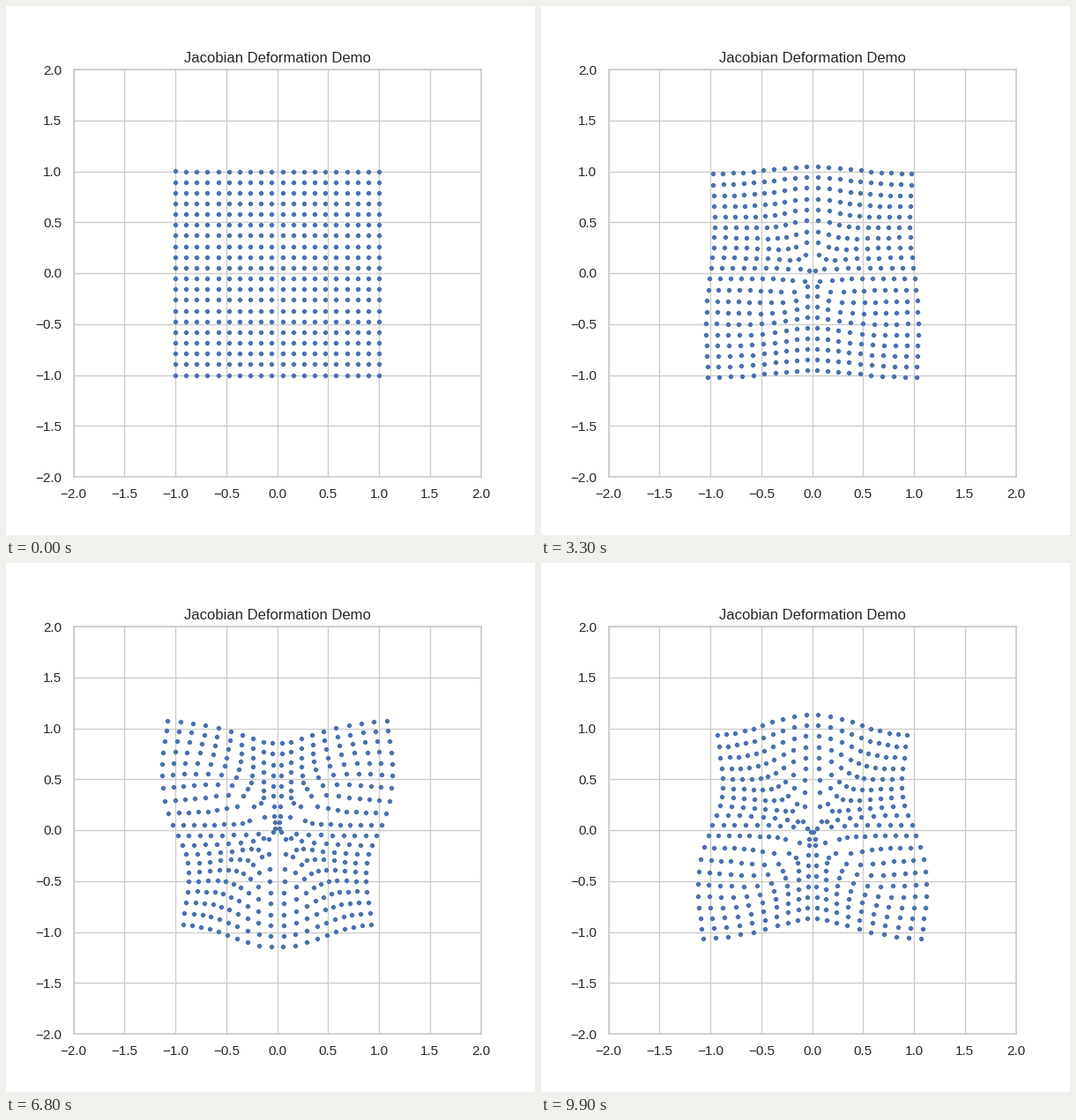
A matplotlib script for the animation above (10000 ms loop, 600 by 600 pixels).

```python
import numpy as np
import matplotlib.pyplot as plt
from matplotlib.animation import FuncAnimation

FRAMES = 100
STEP_MS = 100
AMPLITUDE = 0.3
INK = "0.15"
GRID = "0.8"
BLUE = "#4c72b0"

plt.rcParams.update({
    "font.family": "Liberation Sans",
    "text.color": INK,
    "axes.edgecolor": GRID,
    "axes.linewidth": 1.25,
    "axes.axisbelow": True,
    "grid.color": GRID,
    "grid.linewidth": 1,
    "lines.solid_capstyle": "round",
})

side = np.linspace(-1, 1, 20)
x, y = (g.ravel() for g in np.meshgrid(side, side))
radius = np.hypot(x, y)
theta = np.arctan2(y, x)


def deform(t):
    """Push each point along its radius by a pulsing three-lobed wave."""
    r = radius + AMPLITUDE * np.sin(t) * np.sin(3 * theta)
    return np.column_stack([r * np.cos(theta), r * np.sin(theta)])


fig, ax = plt.subplots(figsize=(6, 6), dpi=100)
ticks = np.arange(-2, 2.1, 0.5)
ax.set(xlim=(-2, 2), ylim=(-2, 2), xticks=ticks, yticks=ticks, aspect="equal")
ax.grid(True)
ax.tick_params(length=6, pad=3.5, labelsize=11, labelcolor=INK,
               bottom=False, left=False)
ax.set_title("Jacobian Deformation Demo", fontsize=12)
dots = ax.scatter(x, y, s=9, color=BLUE, linewidths=1, snap=True)


def update(i):
    dots.set_offsets(deform(0.1 * i))
    return (dots,)


anim = FuncAnimation(fig, update, frames=FRAMES, interval=STEP_MS,
                     repeat=True, repeat_delay=0)
plt.show()
```
